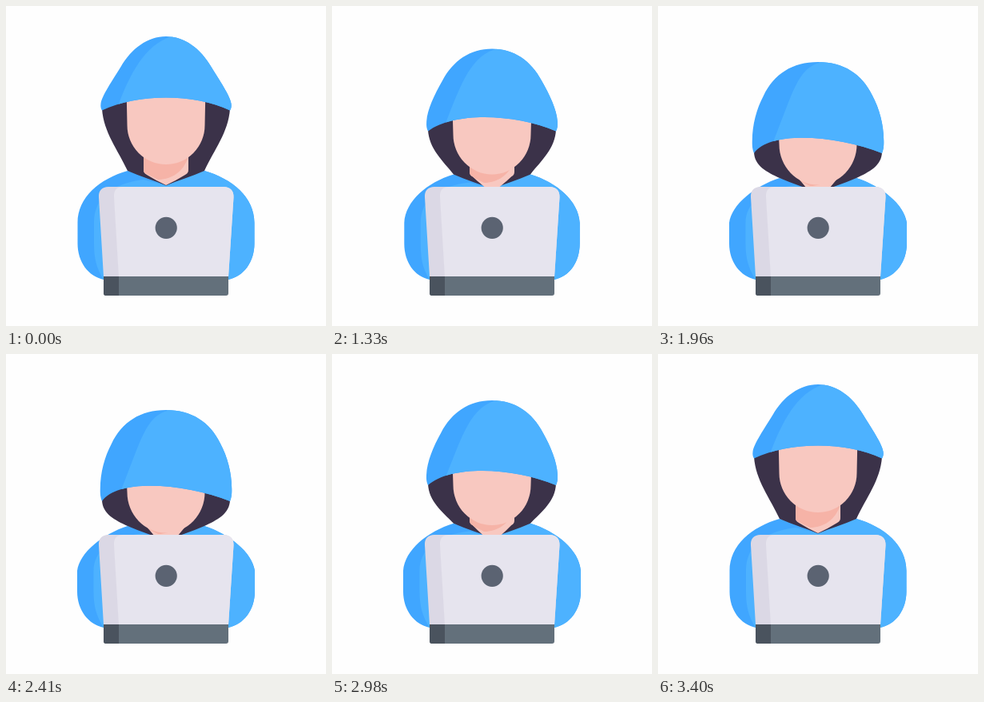
Write an HTML page with a canvas that moves like this. It is 400 by 400 pixels and loops after 3.43 s.

```html
<!DOCTYPE html>
<html lang="en">
<head>
<meta charset="utf-8">
<title>Hooded figure at a laptop</title>
<style>
  html, body { margin: 0; width: 100%; height: 100%; overflow: hidden; background: #fefefe; }
  canvas { display: block; width: 100vmin; height: 100vmin; }
</style>
</head>
<body>
<canvas id="stage" width="400" height="400"></canvas>
<script>
const ctx = document.getElementById('stage').getContext('2d');
const LOOP = 3430;
const COLOR = {
  page: '#fefefe', blue: '#4db2ff', blueShade: '#40a6ff', lining: '#3b3249',
  skin: '#f8c8c0', skinShade: '#f6b3a7', lid: '#e6e4ee', lidShade: '#dbd8e5',
  base: '#63707b', baseShade: '#4a535e', dot: '#5b6372'
};

// [time, value] keys: head lowering (0 = upright, 1 = ducked) and body swelling in pixels.
const DUCK = [[0, 0], [1120, 0], [1560, 1.06], [1740, 1], [2820, 1], [3220, -0.15], [3400, 0], [LOOP, 0]];
const SWELL = [[0, 0], [1030, 0], [1330, -0.8], [1570, 1.4], [1900, 0.5], [2650, 0.5],
  [2830, 1.4], [2980, 0.5], [3400, 0], [LOOP, 0]];

// Left half of the hood, brim corner to crown, as a start point and three cubics.
const HOOD = {
  up: [120, 130.5, 118.5, 128, 118, 126, 118.5, 122, 120, 112, 133, 93, 143.5, 76, 157, 53, 177, 38, 200, 38],
  down: [120, 184, 118, 179, 117.6, 175, 117.8, 168, 118, 148, 123, 129, 132, 112, 145, 85, 168, 70, 200, 70]
};

const easeInOut = u => u < 0.5 ? 2 * u * u : 1 - 2 * (1 - u) ** 2;

function track(keys, t) {
  const i = Math.max(1, keys.findIndex(key => key[0] > t));
  const [t0, a] = keys[i - 1], [t1, b] = keys[i];
  return a + (b - a) * easeInOut((t - t0) / (t1 - t0));
}

function fill(color, trace) {
  ctx.beginPath();
  trace(ctx);
  ctx.closePath();
  ctx.fillStyle = color;
  ctx.fill();
}

function clipped(trace, draw) {
  ctx.save();
  ctx.beginPath();
  trace(ctx);
  ctx.closePath();
  ctx.clip();
  draw();
  ctx.restore();
}

// Traces cubics along the left side and mirrors them back on the right.
function traceMirrored(c, pts) {
  c.moveTo(pts[0], pts[1]);
  for (let i = 2; i < pts.length; i += 6) c.bezierCurveTo(...pts.slice(i, i + 6));
  c.lineTo(400 - pts.at(-2), pts.at(-1));
  for (let i = pts.length - 8; i >= 0; i -= 6) {
    c.bezierCurveTo(400 - pts[i + 4], pts[i + 5], 400 - pts[i + 2], pts[i + 3], 400 - pts[i], pts[i + 1]);
  }
}

function drawBody(p, swell) {
  const left = 89.5 - swell, top = 206 + 9 * p;
  const outline = c => traceMirrored(c, [
    122, 342, 103, 338, left, 320, left, 297,
    left, 290, left, 280, left, 271,
    left + 3 * p, 239 + 9 * p, 117 + 4 * p, 216 + 9 * p, 152, top,
    170, top + 4, 185, top + 10, 200, top + 18
  ]);
  fill(COLOR.blueShade, outline);
  clipped(outline, () => fill(COLOR.blue, c => {
    const x = left + 20.5;
    c.moveTo(122, 342);
    c.bezierCurveTo(113, 328, x, 315, x, 297);
    c.lineTo(x, 271);
    c.bezierCurveTo(x, 240 + 6 * p, 132, 222 + 6 * p, 172, 217 + 7 * p);
    c.lineTo(200, top + 18);
    c.lineTo(248, top - 2);
    c.lineTo(330, top);
    c.lineTo(330, 345);
  }));
}

function drawHead(p) {
  const mix = (a, b) => a + (b - a) * p;
  const hem = mix(130.5, 184), collar = 206 + 9 * p;

  fill(COLOR.lining, c => traceMirrored(c, [
    200, collar + 18.5, 185, collar + 12, 168, collar + 7, 152, collar,
    mix(140, 137), mix(180, 208), mix(122, 120), mix(158, 200), 120, hem - 2,
    140, hem - 25, 170, hem - 32, 200, hem - 32
  ]));

  const nape = 5 * p;
  const neck = c => traceMirrored(c, [
    200, 224 + 20 * p, 192, 220 + 15 * p, 184, 216 + 10 * p, 176, 211 + nape,
    173, 209 + nape, 172, 208 + nape, 172, 204 + nape,
    172, 196 + nape, 172, 188 + nape, 172, 180 + nape
  ]);
  fill(COLOR.skin, neck);
  clipped(neck, () => fill(COLOR.skinShade, c => {
    const drop = 8 * p;
    c.moveTo(170, 180 + drop);
    c.lineTo(170, 207 + drop);
    c.lineTo(190, 217 + drop);
    c.bezierCurveTo(206, 217 + drop, 222, 208 + drop, 228, 188 + drop);
    c.lineTo(228, 180 + drop);
  }));

  const jaw = mix(149, 173), chin = mix(198, 223.5);
  fill(COLOR.skin, c => {
    c.moveTo(150.5, hem - 30);
    c.lineTo(151.5, jaw);
    c.ellipse(200, jaw, 48.5, chin - jaw, 0, Math.PI, 0, true);
    c.lineTo(249.5, hem - 30);
  });

  const pts = HOOD.up.map((v, i) => mix(v, HOOD.down[i]));
  const hood = c => {
    traceMirrored(c, pts);
    c.bezierCurveTo(mix(235, 225), mix(109, 162), mix(165, 140), mix(109, 155), pts[0], pts[1]);
  };
  fill(COLOR.blueShade, hood);
  clipped(hood, () => fill(COLOR.blue, c => {
    c.moveTo(mix(211, 209), mix(37, 69));
    c.bezierCurveTo(175, mix(45, 74), mix(155, 170), mix(85, 105), mix(141, 144), mix(122, 170));
    c.lineTo(mix(139, 142), hem + 5);
    c.lineTo(300, hem + 5);
    c.lineTo(300, mix(37, 69));
  }));
}

function drawLaptop() {
  const lid = c => {
    c.moveTo(122, 338.5);
    c.lineTo(116, 239);
    c.bezierCurveTo(115.5, 231, 120, 226, 128, 226);
    c.lineTo(272, 226);
    c.bezierCurveTo(280, 226, 285, 231, 284.5, 239);
    c.lineTo(278, 338.5);
  };
  fill(COLOR.lidShade, lid);
  clipped(lid, () => fill(COLOR.lid, c => {
    c.moveTo(141, 339);
    c.lineTo(135, 239);
    c.bezierCurveTo(134.5, 231, 138, 226, 146, 226);
    c.lineTo(290, 226);
    c.lineTo(290, 339);
  }));
  fill(COLOR.dot, c => c.arc(200.2, 277.3, 13.6, 0, 2 * Math.PI));

  const base = c => c.roundRect(122, 338, 156, 24, [0, 0, 3, 3]);
  fill(COLOR.base, base);
  clipped(base, () => fill(COLOR.baseShade, c => c.rect(122, 338, 19, 25)));
}

function render(now) {
  const t = now % LOOP;
  const duck = track(DUCK, t);
  ctx.fillStyle = COLOR.page;
  ctx.fillRect(0, 0, 400, 400);
  drawBody(duck, track(SWELL, t));
  drawHead(duck);
  drawLaptop();
}

const start = performance.now();
function tick() {
  render(performance.now() - start);
  requestAnimationFrame(tick);
}
tick();
</script>
</body>
</html>
```
